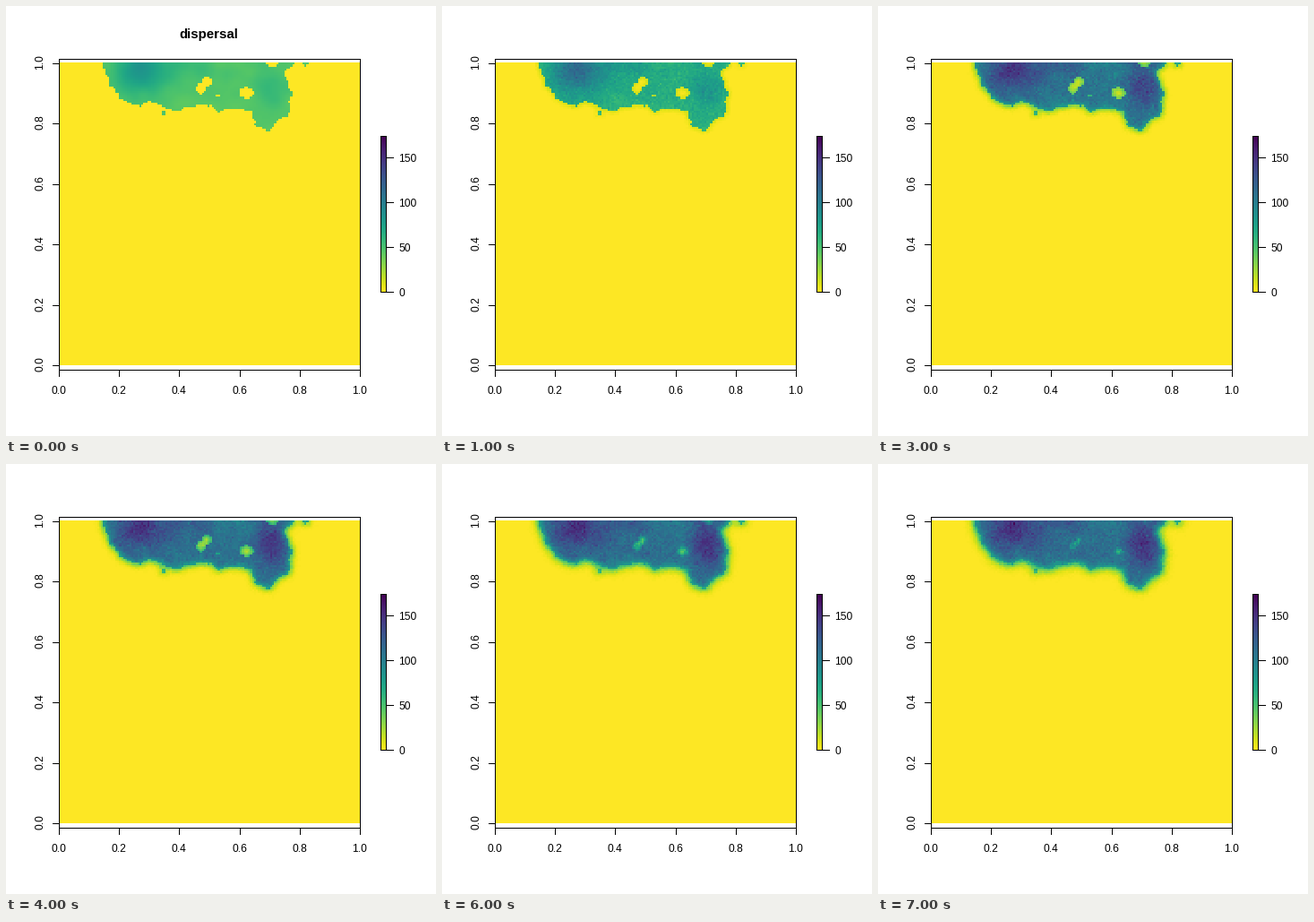
These frames come from a looping animation (480 px wide and 480 px high, 8000 ms). A matplotlib script:

```python
import numpy as np
import matplotlib.pyplot as plt
from matplotlib.animation import FuncAnimation
from matplotlib.path import Path
from matplotlib.patches import Rectangle

SIZE, DPI = 480, 80
PX = 72 / DPI                       # points per pixel
N, STEPS = 150, 8
LEFT, RIGHT, TOP, BOTTOM = 59, 395.5, 64, 401.5
VMAX = 173.5

# Coarse outline of the habitat in stage pixels; noise roughens it
COAST = [(107, 60), (113, 75), (115, 90), (126, 101), (134, 109), (149, 113),
         (162, 107), (174, 113), (193, 118), (212, 111), (229, 112), (236, 121),
         (242, 116), (274, 117), (278, 134), (294, 141), (303, 130), (315, 124),
         (315, 104), (321, 97), (310, 78), (312, 71), (323, 66), (323, 60)]

X, Y = np.meshgrid(LEFT + (np.arange(N) + 0.5) * (RIGHT - LEFT) / N,
                   TOP + (np.arange(N) + 0.5) * (BOTTOM - TOP) / N)
rng = np.random.default_rng(4)


def spread(a):
    """Share individuals evenly with cells up to two steps away."""
    p = np.pad(a, 2, mode="edge")
    p = sum(p[i:i + N] for i in range(5)) / 5
    return sum(p[:, i:i + N] for i in range(5)) / 5


def texture(passes, height):
    a = rng.normal(size=(N, N))
    for _ in range(passes):
        a = spread(a)
    return a * height / a.std()


def bump(x, y, sx, sy, height):
    return height * np.exp(-((X - x) / sx) ** 2 / 2 - ((Y - y) / sy) ** 2 / 2)


def blob(x, y, rx, ry):
    return ((X - x) / rx) ** 2 + ((Y - y) / ry) ** 2 < 1


def simulate():
    warped = np.column_stack([(X + texture(1, 0.9)).ravel(), (Y + texture(1, 0.9)).ravel()])
    habitat = Path(COAST).contains_points(warped).reshape(N, N)
    habitat |= blob(175.5, 120.5, 2, 2) | blob(334, 65, 2.5, 2.5)
    empty = (blob(217, 93, 5, 6) | blob(224, 85, 6, 6) | blob(268, 98, 8, 6)
             | blob(297, 65, 6, 4) | blob(236, 101, 3, 1.3))

    rough = texture(3, 1.5)
    n = (46 + bump(150, 72, 20, 19, 37) + bump(195, 70, 18, 12, 9)
         + bump(294, 94, 12, 16, 12) + bump(245, 72, 25, 10, 4) + rough)
    n = np.where(habitat & ~empty, n, 0)

    limit = (107 + bump(150, 74, 20, 15, 38) + bump(195, 70, 20, 12, 12)
             + bump(295, 90, 12, 18, 40) + 2 * rough)
    limit *= 0.45 + 0.55 * spread(habitat.astype(float))     # thinner at the rim

    states = [n]
    for _ in range(STEPS - 1):
        grown = 1.42 * n / (1 + 0.42 * (n / limit) ** 4)
        mixed = 0.55 * n + 0.45 * spread(n)
        n = np.where(habitat, np.maximum(grown, mixed), mixed)
        n = np.clip(n + 0.45 * np.sqrt(n) * rng.normal(size=(N, N)), 0, VMAX)
        states.append(n)
    return states


STATES = simulate()

fig = plt.figure(figsize=(SIZE / DPI, SIZE / DPI), dpi=DPI, facecolor="white")
ax = fig.add_axes([0, 0, 1, 1])
ax.axis("off")


def line(x0, y0, x1, y1):
    ax.plot([x0, x1], [y0, y1], color="black", lw=PX, antialiased=False,
            solid_capstyle="projecting", snap=True, zorder=3)


def box(x0, y0, x1, y1):
    ax.add_patch(Rectangle((x0, y0), x1 - x0, y1 - y0, fill=False, ec="black",
                           lw=PX, antialiased=False, snap=True, zorder=3))


def label(x, y, text, size=12, **kw):
    return ax.text(x, y, text, fontsize=size * PX, family="Liberation Sans",
                   color="black", **kw)


style = dict(cmap="viridis_r", vmin=0, vmax=VMAX, aspect="auto", interpolation="nearest")
raster = ax.imshow(STATES[0], extent=(LEFT, RIGHT, BOTTOM, TOP), **style)
ramp = np.linspace(VMAX, 0, 175)[:, None]
ax.imshow(ramp, extent=(418, 425, 320, 145), **style)
ax.set_xlim(0, SIZE)
ax.set_ylim(SIZE, 0)

box(59, 59, 395, 406)
for k in range(6):
    x, y = round(59 + 67.2 * k), round(401 - 67.4 * k)
    text = f"{k / 5:.1f}"
    line(x, 406, x, 413)
    line(52, y, 59, y)
    label(x - 0.5, 433, text, ha="center", va="baseline")
    label(38, y - 1, text, ha="center", va="center", rotation=90)

box(418, 145, 424, 319)
for value in (0, 50, 100, 150):
    y = round(319 - value * 174 / VMAX)
    line(424, y, 432, y)
    label(438.6, y + 5.5, str(value), ha="left", va="baseline")

title = label(226.4, 36, "dispersal", 15, weight="bold", ha="center", va="baseline")


def draw(i):
    raster.set_data(STATES[i])
    title.set_visible(i == 0)
    return raster, title


anim = FuncAnimation(fig, draw, frames=STEPS, interval=1000, repeat=True)
plt.show()
```
